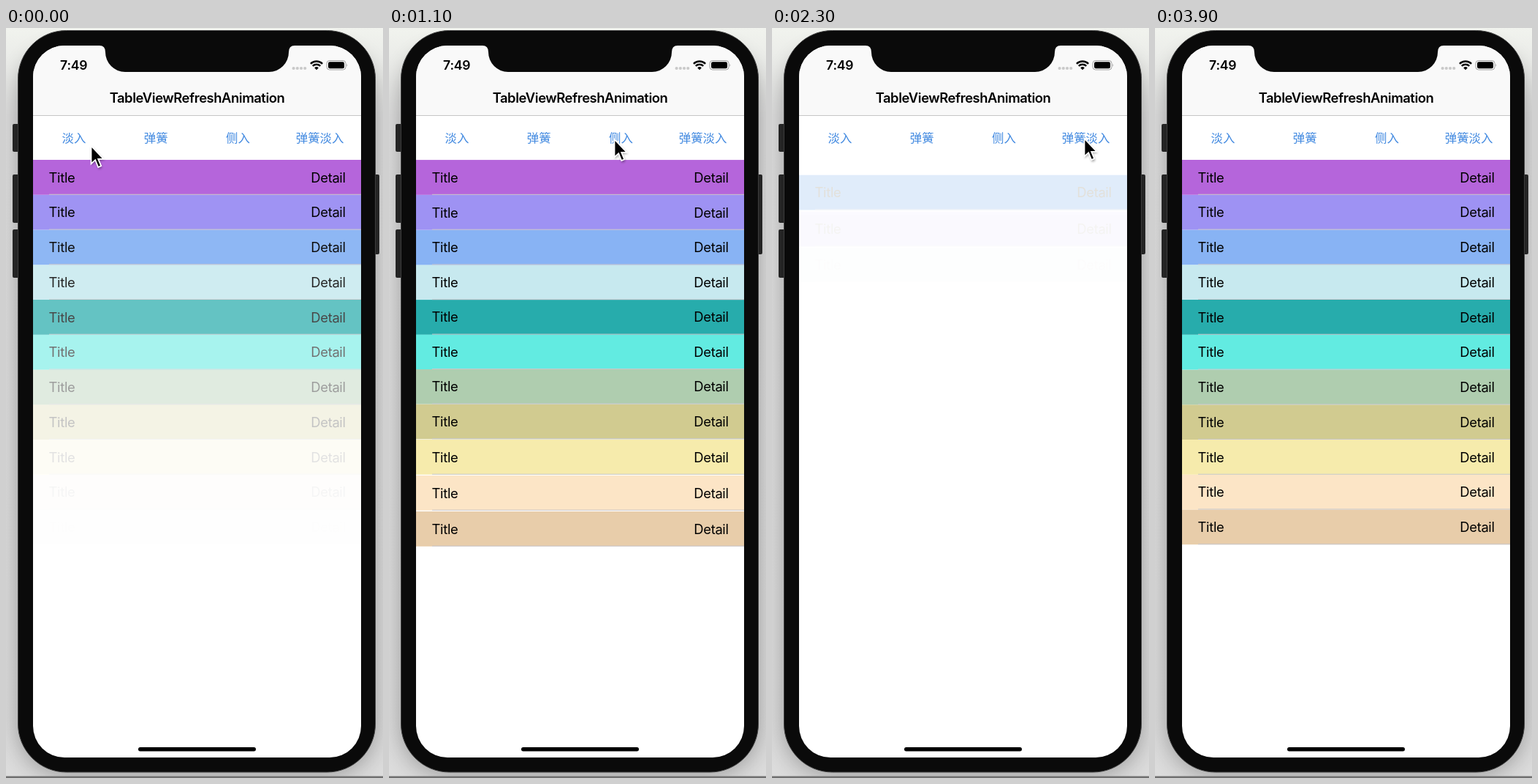
Recreate the animation shown at these times as an HTML page. Size 516 by 1024 pixels, loop 4000 ms.

```html
<!DOCTYPE html>
<html lang="zh">
<head>
<meta charset="utf-8">
<title>TableViewRefreshAnimation</title>
<style>
html, body { margin: 0; width: 516px; height: 1024px; overflow: hidden; background: #d6d6d6; }
svg { display: block; }
text { font-family: Inter, "Noto Sans", sans-serif; font-size: 18.4px; letter-spacing: -.35px; }
.bold { font-weight: 600; letter-spacing: -.45px; text-anchor: middle; }
.time { font-size: 17.6px; letter-spacing: -.2px; }
.tab { font-family: "Noto Sans CJK SC", "Noto Sans CJK", sans-serif; font-size: 16.4px; letter-spacing: 0; fill: #4189e0; text-anchor: middle; }
.end { text-anchor: end; }
</style>
</head>
<body>
<svg width="516" height="1024" viewBox="0 0 516 1024">
  <defs>
    <linearGradient id="wall" x2="0" y2="1">
      <stop offset="0" stop-color="#f1f3ee"/>
      <stop offset=".12" stop-color="#dedede"/>
      <stop offset="1" stop-color="#dcdcdc"/>
    </linearGradient>
    <filter id="blur" x="-20%" y="-20%" width="140%" height="140%"><feGaussianBlur stdDeviation="16"/></filter>
    <filter id="soft" x="-50%" y="-50%" width="200%" height="200%"><feGaussianBlur stdDeviation="1.5"/></filter>
    <clipPath id="screen"><rect x="37" y="24" width="449" height="972" rx="43"/></clipPath>
    <clipPath id="table"><rect x="37" y="180" width="449" height="816"/></clipPath>
  </defs>

  <rect width="516" height="1024" fill="url(#wall)"/>
  <rect x="16" y="30" width="490" height="990" rx="66" fill="#000" opacity=".3" filter="url(#blur)"/>
  <rect y="1021.5" width="516" height="2.5" fill="#707070"/>

  <g fill="#242424">
    <rect x="9" y="131" width="10" height="38" rx="2"/>
    <rect x="9" y="200" width="10" height="66" rx="2"/>
    <rect x="9" y="275" width="10" height="66" rx="2"/>
    <rect x="502" y="200" width="9" height="109" rx="2"/>
  </g>
  <rect x="16.5" y="3.5" width="489" height="1012.5" rx="66" fill="#0a0a0a" stroke="#3c3c3c"/>

  <g clip-path="url(#screen)">
    <rect x="37" y="24" width="449" height="972" fill="#fff"/>
    <rect x="37" y="24" width="449" height="95.5" fill="#f9f9f9"/>
    <rect x="37" y="119" width="449" height="1" fill="#c6c6c6"/>
    <g clip-path="url(#table)"><g id="rows"></g></g>
    <path d="M128 24h267q-8 0-8 9a27 27 0 0 1-27 27H163a27 27 0 0 1-27-27q0-9-8-9z" fill="#0a0a0a"/>
  </g>

  <text class="bold time" x="92.7" y="57">7:49</text>
  <text class="bold" x="261.5" y="102.3">TableViewRefreshAnimation</text>
  <g id="tabs"></g>

  <g fill="#c9c9c9">
    <circle cx="393.6" cy="55" r="2.1"/><circle cx="398.8" cy="55" r="2.1"/>
    <circle cx="404" cy="55" r="2.1"/><circle cx="409.2" cy="55" r="2.1"/>
  </g>
  <g fill="none" stroke="#000" stroke-width="2.5">
    <path d="M416.9 48.9a11.5 11.5 0 0 1 16.2 0"/>
    <path d="M419.8 51.8a7.4 7.4 0 0 1 10.4 0"/>
    <path d="M425 57.3l-2.8-2.9a4 4 0 0 1 5.6 0z" fill="#000" stroke="none"/>
  </g>
  <rect x="439" y="44.5" width="26" height="12.5" rx="3.8" fill="none" stroke="#a0a0a0"/>
  <rect x="441" y="46.3" width="22" height="8.9" rx="2.2"/>
  <path d="M466.4 48.7q1.6 2 0 4z" fill="#a0a0a0"/>
  <rect x="181" y="982" width="161" height="5.4" rx="2.7"/>

  <g id="cursor">
    <path d="M0 1V27L6 21.5 10 32 14.6 30 10.5 20H18z" transform="translate(1 2)" opacity=".35" filter="url(#soft)"/>
    <path d="M.5 2V26.5L6.2 21.2 10.2 31 14.2 29.3 10.2 19.8H17.6z" stroke="#fff" stroke-width="1.8"/>
  </g>
</svg>
<script>
const LOOP = 4000, STEP = 100;
const TOP = 180, LEFT = 37, WIDTH = 449, PITCH = 47.75;
const DELAY = 30, SPAN = 300;
const colors = ['#b565db', '#9e92f3', '#88b3f4', '#c7e9ef', '#27acac', '#62ebe1',
  '#afcdaf', '#d1cb90', '#f6ebac', '#fce5c6', '#e8cdaa'];
const $ = id => document.getElementById(id);

function add(parent, tag, attrs, label) {
  const el = document.createElementNS('http://www.w3.org/2000/svg', tag);
  for (const k in attrs) el.setAttribute(k, attrs[k]);
  if (label) el.textContent = label;
  return parent.appendChild(el);
}

['淡入', '弹簧', '侧入', '弹簧淡入'].forEach((s, i) =>
  add($('tabs'), 'text', { class: 'tab', x: 93 + 112.2 * i, y: 156 }, s));

// Upper rows lie over lower ones, so build from the bottom up.
const rows = [];
for (let i = colors.length - 1; i >= 0; i--) {
  const g = add($('rows'), 'g', {});
  const fill = add(g, 'rect', { x: LEFT, width: WIDTH, height: PITCH, fill: colors[i] });
  add(g, 'rect', { x: 59, y: PITCH - 1, width: WIDTH - 22, height: 1, fill: '#c8c7cc' });
  const words = add(g, 'g', {});
  add(words, 'text', { x: 58.6, y: 30.6 }, 'Title');
  add(words, 'text', { x: 464.6, y: 30.6, class: 'end' }, 'Detail');
  rows[i] = { g, fill, words };
}

const clamp = x => Math.max(0, Math.min(1, x));

// Ease-in-out: cubic-bezier(.42, 0, .58, 1)
function ease(x) {
  x = clamp(x);
  let lo = 0, hi = 1;
  for (let n = 0; n < 24; n++) {
    const s = (lo + hi) / 2, r = 1 - s;
    if (3 * r * r * s * .42 + 3 * r * s * s * .58 + s ** 3 < x) lo = s; else hi = s;
  }
  return lo * lo * (3 - 2 * lo);
}

// Remaining share of the offset of a damped spring
function spring(ms) {
  const w = .69 * Math.max(0, ms) / 30;
  return Math.exp(-.436 * w) * (Math.cos(w) + .436 * Math.sin(w));
}

// Each effect maps a row's elapsed time to its offset and opacity.
const effects = [
  { start: -309, pose: ms => ({ a: ease(ms / SPAN) }) },
  { start: 500, pose: ms => ({ y: 48 * spring(ms) }) },
  { start: 1343, pose: ms => ({ x: WIDTH * (1 - ease(ms / SPAN)) }) },
  { start: 2223, tint: true, pose: ms => {
    const e = ease(ms / SPAN);
    return { y: 24 * (1 - e), a: e };
  } }
];

// Cursor moves: from, to (ms), then the place reached
const moves = [
  [0, 0, 116, 159], [120, 450, 205, 157], [720, 1060, 308, 150],
  [1450, 1760, 410, 151], [1850, 2150, 427, 149], [2900, 3400, 540, 190]
];

function cursorAt(t) {
  let [, , x, y] = moves[0];
  for (const [from, to, nx, ny] of moves.slice(1)) {
    const e = ease((t - from) / (to - from));
    x += (nx - x) * e;
    y += (ny - y) * e;
  }
  return `translate(${x.toFixed(2)} ${y.toFixed(2)})`;
}

function draw(t) {
  const fx = effects.filter(e => e.start <= t).pop();
  rows.forEach((row, i) => {
    const { x = 0, y = 0, a = 1 } = fx.pose(t - fx.start - DELAY * i);
    const pale = fx.tint && a < .25;
    row.g.setAttribute('transform', `translate(${x.toFixed(2)} ${(TOP + PITCH * i + y).toFixed(2)})`);
    row.g.setAttribute('opacity', a.toFixed(3));
    row.fill.setAttribute('fill', pale && i === 0 ? '#2379de' : colors[i]);
    row.words.setAttribute('fill', pale ? '#3a2a00' : '#000');
  });
  $('cursor').setAttribute('transform', cursorAt(t));
}

const begin = performance.now();
function tick() {
  const t = (performance.now() - begin) % LOOP;
  draw(Math.floor(t / STEP) * STEP);
  requestAnimationFrame(tick);
}
tick();
</script>
</body>
</html>
```
